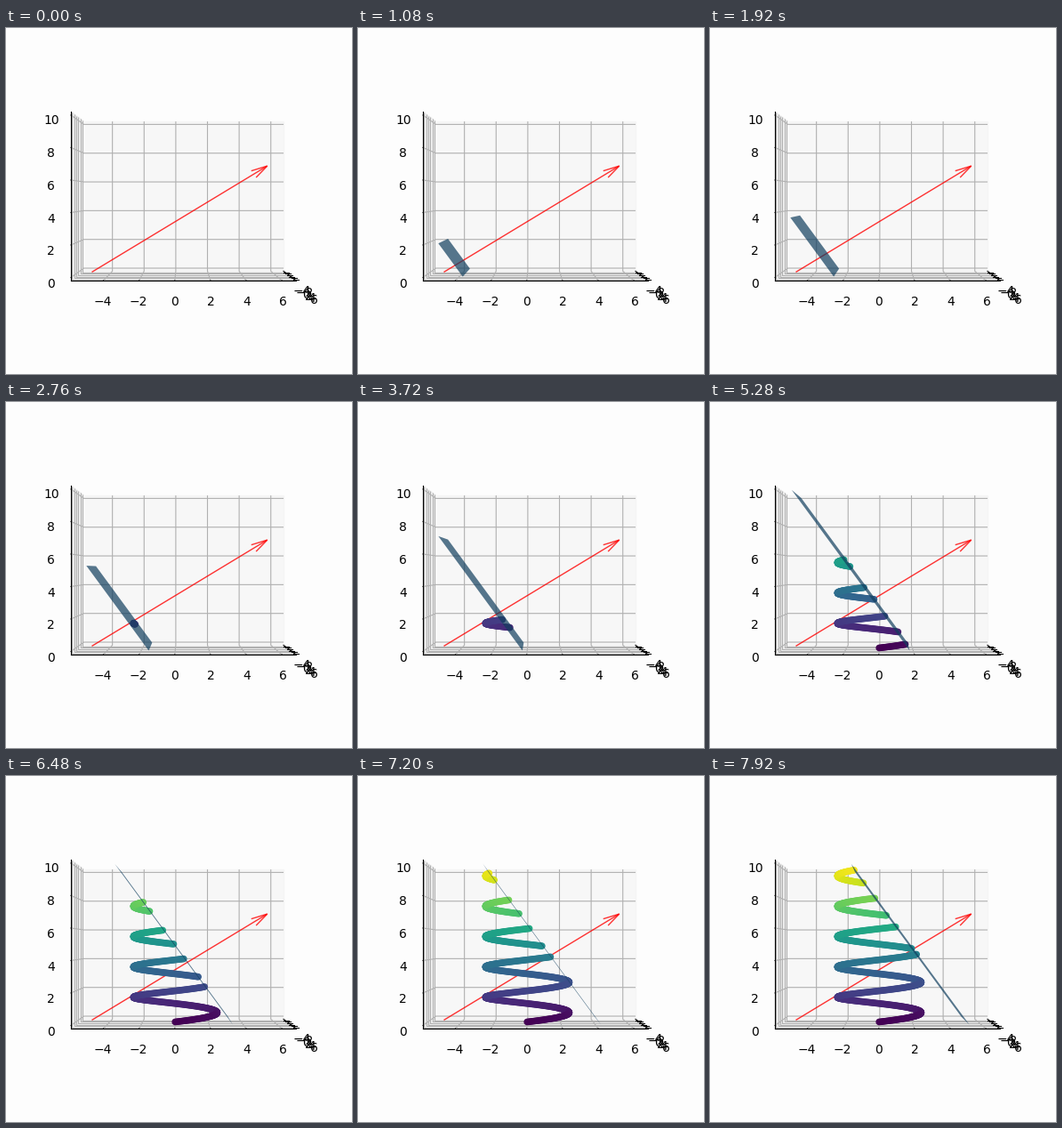
A matplotlib script that plays this animation: 389x389 px, repeating every 8 s.

```python
import numpy as np
import matplotlib.pyplot as plt
from matplotlib.animation import FuncAnimation
from mpl_toolkits.mplot3d.art3d import Poly3DCollection

SIZE, DPI = 389, 100
HOLD = 3            # ticks of 40 ms per visible step
LO, HI = -5, 6      # extent of the plane in x and y
SLOPE = 1.5         # plane: z = level - SLOPE * y
PAPER = "#fdfdfd"

fig = plt.figure(figsize=(SIZE / DPI, SIZE / DPI), dpi=DPI, facecolor=PAPER)
box = 369.6 / SIZE
ax = fig.add_axes([10 / SIZE, 10 / SIZE, box, box], projection="3d",
                  facecolor=PAPER)
ax.view_init(elev=0, azim=0)


def padded(lo, hi):
    pad = (hi - lo) / 48
    return lo - pad, hi + pad


ax.set_xlim(*padded(-5.55, 6.55))
ax.set_ylim(*padded(-5.55, 6.55))
ax.set_zlim(*padded(0, 10))

ax.quiver(0, -5, 0, 0, 10.5, 7, color="red", linewidth=1, alpha=0.8,
          arrow_length_ratio=0.08)

hz = np.linspace(0, 10, 1000)
hx = 2.5 * np.cos(np.pi * hz)
hy = 2.5 * np.sin(np.pi * hz)
parts = []


def plane(level):
    top = min(10, level - SLOPE * LO)
    y_top, y_bottom = (level - top) / SLOPE, level / SLOPE
    quad = [(LO, y_top, top), (HI, y_top, top),
            (HI, y_bottom, 0), (LO, y_bottom, 0)]
    return Poly3DCollection([quad], facecolors=[(0.063, 0.243, 0.368, 0.7)],
                            linewidths=0)


def clear():
    while parts:
        parts.pop().remove()
    return []


def update(tick):
    clear()
    step = tick // HOLD
    level = -7.5 + 6.5 * 3.5 * step / 99
    seen = hz + SLOPE * hy < level
    if seen.any():
        parts.append(ax.scatter(hx[seen], hy[seen], hz[seen], c=hz[seen],
                                cmap="viridis", vmin=0, vmax=10, s=20,
                                depthshade=False))
    if step:
        parts.append(ax.add_collection3d(plane(level)))
    return parts


anim = FuncAnimation(fig, update, frames=200, interval=40, init_func=clear,
                     repeat=True, repeat_delay=0, blit=False)
plt.show()
```
